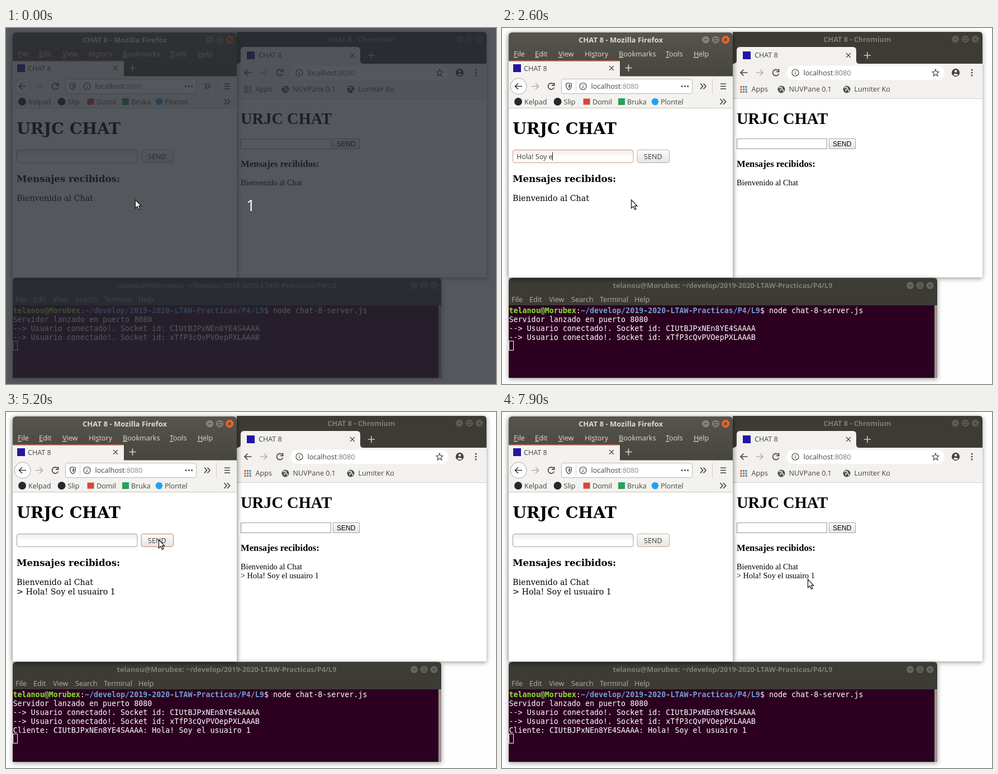
Animation of 877x638 px, one loop 8 s. Source, as an HTML page:

```html
<!DOCTYPE html>
<html lang="es">
<head>
<meta charset="utf-8">
<title>Chat</title>
<style>
html, body { margin: 0; width: 100%; height: 100%; overflow: hidden; background: #fefefe; }
svg { display: block; }
text { font: 12.6px "Open Sans", "Noto Sans", sans-serif; white-space: pre; }
.win { filter: drop-shadow(0 2px 4px rgba(0, 0, 0, .4)); }
.front { filter: drop-shadow(0 2px 5px rgba(0, 0, 0, .6)); }
.title { font-size: 13.1px; font-weight: bold; text-anchor: middle; fill: #dfdbd2; }
.idle { font-size: 12.7px; fill: #807d76; }
.menu { fill: #dfdbd2; }
.mn { text-decoration: underline; }
.dim { fill: #b3afa6; }
.ui { fill: #45443f; }
.line { fill: none; stroke: #45443f; stroke-width: 1.7; }
.soft { stroke: #b4b2ae; }
.thin { stroke-width: 1.2; }
.dots { stroke-width: 3; stroke-linecap: round; }
.serif text { font: 14.25px "DejaVu Serif", serif; }
.times text { font: 14.25px "Liberation Serif", serif; }
.page .h1 { font-size: 28.5px; font-weight: bold; }
.page .h3 { font-size: 16.67px; font-weight: bold; }
.page .field { font: 12.6px "Open Sans", "Noto Sans", sans-serif; fill: #3c3c3c; }
.page .arial { font: 12px "Liberation Sans", sans-serif; }
.term text { font: 13.33px "DejaVu Sans Mono", monospace; fill: #fff; }
.term .user { font-weight: bold; fill: #8ae234; }
.term .path { font-weight: bold; fill: #729fcf; }
#count { font-size: 28px; text-anchor: middle; fill: #fff; }
</style>
</head>
<body>
<svg width="877" height="638" viewBox="0 0 877 638">
  <defs>
    <linearGradient id="bar" x2="0" y2="1"><stop stop-color="#56554c"/><stop offset="1" stop-color="#47463e"/></linearGradient>
    <linearGradient id="well" x2="0" y2="1"><stop stop-color="#ededec"/><stop offset=".6" stop-color="#fff"/></linearGradient>
    <linearGradient id="key" x2="0" y2="1"><stop stop-color="#fbfbfa"/><stop offset="1" stop-color="#e6e5e2"/></linearGradient>
    <g id="info"><circle r="6" class="line thin"/><path d="M0-1V3.4M0-3.6V-2.2" class="line thin"/></g>
    <path id="reload" d="M4.6-3.4A5.6 5.6 0 1 0 5.4 2M5.6-6.5V-1.6H.8" class="line"/>
    <path id="left" d="M6.5 0H-6M-.5-5.5L-6 0L-.5 5.5"/>
    <path id="cross" d="M-4-4L4 4M4-4L-4 4" class="line thin"/>
    <path id="plus" d="M-6 0H6M0-6V6"/>
    <path id="more" d="M-5-5L-.5 0L-5 5M.5-5L5 0L.5 5" class="line"/>
    <g id="globe"><circle r="6.5" fill="#4b4f54"/><path d="M-4.5-2.5Q-1-5 1-3Q3 0-1 0Q-1 3-3 2M2 1Q5 1 3 4" fill="none" stroke="#f2f1ee" stroke-width="1.6"/></g>
    <g id="buttons">
      <circle r="6.5"/><circle cx="17.7" r="6.5"/><circle cx="35.5" r="6.5"/>
      <path d="M-3 0H3M15-2.7H20.4V2.7H15ZM33-2.5L38 2.5M38-2.5L33 2.5" stroke="#35342f" fill="none"/>
    </g>
  </defs>

  <g class="win">
    <path d="M413 447V7H854Q860 7 860 13V447Z" fill="#fff"/>
    <path d="M413 64V7H854Q860 7 860 13V64Z" fill="#3c3b36"/>
    <path d="M413 64Q420 64 420 58V40Q420 34 426 34H628Q634 34 634 40V58Q634 64 640 64H860V126H413Z" fill="#f2f1ee"/>
    <path d="M413 126.5H860" stroke="#cfcdca"/>
    <text class="title idle" x="636" y="25">CHAT 8 - Chromium</text>
    <use href="#buttons" x="811.5" y="20" fill="#5c5b55"/>
    <rect x="431" y="42" width="14" height="14" fill="#2316a6"/>
    <text class="ui" x="452" y="53">CHAT 8</text>
    <use href="#cross" x="620" y="49"/>
    <use href="#plus" x="654" y="49" stroke="#c9c7c0" stroke-width="1.6"/>
    <use href="#left" x="433" y="80" class="line"/>
    <use href="#left" transform="translate(461 80) scale(-1 1)" class="line soft"/>
    <use href="#reload" x="490" y="80"/>
    <rect x="509" y="67.5" width="283" height="25.5" rx="12.7" fill="#fff"/>
    <use href="#info" x="525" y="80"/>
    <text class="ui" x="539.5" y="84.5">localhost<tspan fill="#777">:8080</tspan></text>
    <path d="M776 74L777.7 78.3L782 78.6L778.7 81.4L779.8 86L776 83.4L772.2 86L773.3 81.4L770 78.6L774.3 78.3Z" class="line thin"/>
    <circle cx="812" cy="80" r="7.2" fill="#45443f"/>
    <circle cx="812" cy="77.5" r="2.3" fill="#f2f1ee"/>
    <path d="M807.5 84Q812 79.5 816.5 84Q812 87 807.5 84Z" fill="#f2f1ee"/>
    <path d="M841 75v.1M841 80v.1M841 85v.1" class="line dots"/>
    <g id="apps"></g>
    <text class="ui" y="114"><tspan x="446.5">Apps</tspan><tspan x="513.5">NUVPane 0.1</tspan><tspan x="630.5">Lumiter Ko</tspan></text>
    <use href="#globe" x="500" y="110"/>
    <use href="#globe" x="617" y="110"/>
  </g>
  <g class="page times">
    <text class="h1" x="420" y="172">URJC CHAT</text>
    <rect x="420.5" y="198.5" width="161" height="18" fill="#fff" stroke="#999"/>
    <rect x="585.5" y="198.5" width="47" height="18" fill="url(#key)" stroke="#a5a5a5"/>
    <text class="arial" x="592" y="212">SEND</text>
    <text class="h3" x="420" y="249">Mensajes recibidos:</text>
    <text x="420" y="282">Bienvenido al Chat</text>
    <text class="sent" x="420" y="298">&gt; Hola! Soy el usuairo 1</text>
  </g>

  <g class="win">
    <path d="M12 627V454Q12 448 18 448H773Q779 448 779 454V627Z" fill="#3c3b36"/>
    <rect x="12" y="497" width="762" height="130" fill="#2c0020"/>
    <rect x="774" y="497" width="5" height="130" fill="#98928f"/>
    <text class="title idle" x="395" y="466">telanou@Morubex: ~/develop/2019-2020-LTAW-Practicas/P4/L9</text>
    <use href="#buttons" x="730.5" y="461.5" fill="#66655e"/>
    <text class="menu dim" y="491"><tspan x="17">File</tspan><tspan x="49">Edit</tspan><tspan x="84">View</tspan><tspan x="124">Search</tspan><tspan x="175">Terminal</tspan><tspan x="237">Help</tspan></text>
  </g>
  <g class="term">
    <text x="12.5" y="510.5"><tspan class="user">telanou@Morubex</tspan>:<tspan class="path">~/develop/2019-2020-LTAW-Practicas/P4/L9</tspan>$ node chat-8-server.js</text>
    <text x="12.5" y="526.5">Servidor lanzado en puerto 8080</text>
    <text x="12.5" y="542.5">--&gt; Usuario conectado!. Socket id: CIUtBJPxNEn8YE4SAAAA</text>
    <text x="12.5" y="558.5">--&gt; Usuario conectado!. Socket id: xTfP3cQvPVOepPXLAAAB</text>
    <text class="sent" x="12.5" y="574.5">Cliente: CIUtBJPxNEn8YE4SAAAA: Hola! Soy el usuairo 1</text>
    <rect id="block" x="12.5" y="561" width="8" height="16.5" fill="none" stroke="#fff"/>
  </g>

  <g class="front">
    <path d="M12 447V14Q12 8 18 8H407Q413 8 413 14V447Z" fill="#fff"/>
    <path d="M12 87V14Q12 8 18 8H407Q413 8 413 14V87Z" fill="url(#bar)"/>
    <path d="M12 59H211V86.5H413V143H12Z" fill="#f3f2ef"/>
    <path d="M12 59.2H211" stroke="#e5774f" stroke-width="1.8"/>
    <path d="M12 143.5H413" stroke="#c6c4c0"/>
    <text class="title" x="212.5" y="25.5">CHAT 8 - Mozilla Firefox</text>
    <use href="#buttons" x="364.7" y="21" fill="#85837a"/>
    <circle cx="400.2" cy="21" r="7" fill="#e8623a"/>
    <path d="M397.6 18.4L402.8 23.6M402.8 18.4L397.6 23.6" stroke="#5c2413" stroke-width="1.2"/>
    <text class="menu" y="51"><tspan x="21" class="mn">F</tspan>ile<tspan x="59" class="mn">E</tspan>dit<tspan x="101" class="mn">V</tspan>iew<tspan x="148">Hi</tspan><tspan class="mn">s</tspan>tory<tspan x="209" class="mn">B</tspan>ookmarks<tspan x="293" class="mn">T</tspan>ools<tspan x="343" class="mn">H</tspan>elp</text>
    <rect x="20" y="65" width="14" height="14" fill="#2316a6"/>
    <text class="ui" x="39" y="76.5">CHAT 8</text>
    <use href="#cross" x="196" y="72"/>
    <use href="#plus" x="226.5" y="71.5" stroke="#d8d5cc" stroke-width="1.6"/>
    <circle cx="29.5" cy="104.5" r="14.5" fill="#fdfdfd" stroke="#aaa8a3"/>
    <use href="#left" x="29.5" y="104.5" class="line"/>
    <use href="#left" transform="translate(59.5 104.5) scale(-1 1)" class="line soft"/>
    <use href="#reload" x="88" y="104.5"/>
    <rect x="106.5" y="91.5" width="234" height="26" rx="2.5" fill="#fff" stroke="#bab8b4"/>
    <path d="M119.5 98.5L124.5 100Q125 108 119.5 111Q114 108 114.5 100Z" class="line thin"/>
    <path d="M119.5 101V108.5Q122.5 106 122.3 101.8Z" fill="#45443f"/>
    <path d="M132.5 95V114M376.5 91V118" stroke="#cfcdc9"/>
    <use href="#info" x="145" y="104.5"/>
    <text class="ui" x="159.5" y="109">localhost<tspan fill="#8d8b87">:8080</tspan></text>
    <path d="M322 104.5h.1M327.3 104.5h.1M332.6 104.5h.1" class="line dots"/>
    <use href="#more" x="360" y="104.5"/>
    <path d="M391 100H401M391 104.5H401M391 109H401" class="line"/>
    <use href="#more" x="395.5" y="132"/>
    <circle cx="29" cy="132" r="7" fill="#24292e"/>
    <circle cx="99.5" cy="132" r="7" fill="#24292e"/>
    <rect x="145.5" y="126.5" width="12" height="11" fill="#d5483b"/>
    <rect x="208" y="126" width="12" height="12" fill="#2b9f5b"/>
    <circle cx="274" cy="132" r="6.3" fill="#2ba0ea"/>
    <text class="ui" y="136.5"><tspan x="40">Kelpad</tspan><tspan x="110.5">Slip</tspan><tspan x="162">Domil</tspan><tspan x="224">Bruka</tspan><tspan x="284">Plontel</tspan></text>
  </g>
  <g class="page serif">
    <text class="h1" x="19" y="190">URJC CHAT</text>
    <rect id="input" x="19.5" y="218.5" width="215.5" height="23" rx="3.5" fill="url(#well)"/>
    <text class="field" id="typed" x="26" y="235"></text>
    <path id="caret" d="M.5 222.5V237.5" stroke="#222"/>
    <rect id="send" x="242" y="218.5" width="57.5" height="23" rx="3.5" fill="url(#key)"/>
    <text class="field" x="254" y="235">SEND</text>
    <text class="h3" x="19" y="276">Mensajes recibidos:</text>
    <text x="19" y="309.5">Bienvenido al Chat</text>
    <text class="sent" x="19" y="326.5">&gt; Hola! Soy el usuairo 1</text>
  </g>

  <g id="veil">
    <rect width="877" height="638" fill="#25282f" opacity=".78"/>
    <text id="count" x="438" y="328">1</text>
  </g>
  <path id="arrow" d="M.5 0V15L4 11.8L6.6 17.4L9 16.3L6.5 10.9H10.8Z" fill="#fff" stroke="#111" stroke-width="1.2"/>
  <path id="beam" d="M-2.5-6.5H-.7L0-5.8L.7-6.5H2.5M0-5.8V5.8M-2.5 6.5H-.7L0 5.8L.7 6.5H2.5" fill="none" stroke="#111" stroke-width="1.3"/>
</svg>
<script>
const LOOP = 8000, STEP = 100, FOCUS = 300, PRESS = 5000, SENT = 5100;
const MESSAGE = "Hola! Soy el usuairo 1";
// [time, letters typed so far]
const KEYS = [[600, 1], [800, 2], [900, 3], [1100, 4], [1400, 5], [1600, 6], [1900, 7],
  [2200, 8], [2400, 10], [2600, 11], [2800, 13], [3000, 14], [3100, 15], [3200, 16],
  [3300, 17], [3500, 19], [3600, 21], [3900, 22]];
// [time, x, y] of the pointer
const PATH = [[0, 231, 308], [4300, 231, 308], [4400, 251, 318], [4600, 268, 290],
  [4800, 274, 244], [4900, 273, 229], [5700, 273, 229], [5800, 278, 234], [6000, 390, 258],
  [6200, 497, 280], [6300, 494, 288], [6600, 447, 295], [6900, 518, 297], [7000, 518, 297],
  [7100, 530, 297], [7400, 560, 295], [7700, 560, 295], [7900, 547, 300], [8000, 547, 300]];

const $ = id => document.getElementById(id);
const show = (el, on) => { el.style.display = on ? "" : "none"; };
const sent = document.querySelectorAll(".sent");

const colors = ["#e04a3f", "#5a9e5c", "#3b78d8", "#e8a33a"];
$("apps").innerHTML = Array.from({ length: 9 }, (_, i) => {
  const col = i % 3, row = Math.floor(i / 3);
  return `<rect x="${426.5 + col * 4.5}" y="${104 + row * 4.5}" width="3" height="3" fill="${colors[(i + row) % 4]}"/>`;
}).join("");

function pointer(t) {
  const i = PATH.findIndex(p => p[0] > t);
  const [t0, x0, y0] = PATH[i - 1], [t1, x1, y1] = PATH[i];
  const k = (t - t0) / (t1 - t0);
  return [x0 + (x1 - x0) * k, y0 + (y1 - y0) * k];
}

function draw() {
  const t = Math.floor(performance.now() % LOOP / STEP) * STEP;
  const done = t >= SENT, pressed = t >= PRESS;

  show($("veil"), t < FOCUS);
  sent.forEach(el => show(el, done));
  $("block").setAttribute("y", done ? 577 : 561);

  const count = KEYS.reduce((n, [at, letters]) => t >= at ? letters : n, 0);
  $("typed").textContent = done ? "" : MESSAGE.slice(0, count);
  const focused = t >= FOCUS && !pressed;
  $("input").setAttribute("stroke", focused ? "#d9947c" : "#9f9d99");
  show($("caret"), focused && t < 4400);
  const end = count ? $("typed").getComputedTextLength() : 0;
  $("caret").setAttribute("transform", `translate(${Math.round(25.5 + end)})`);
  $("send").setAttribute("stroke", !pressed ? "#b5b3af" : t < 5800 ? "#cf7f60" : "#cbab98");

  const [x, y] = pointer(t), beam = t >= 6400 && t < 7100;
  show($("beam"), beam);
  show($("arrow"), !beam);
  $(beam ? "beam" : "arrow").setAttribute("transform", `translate(${x} ${y})`);
  requestAnimationFrame(draw);
}
draw();
</script>
</body>
</html>
```
